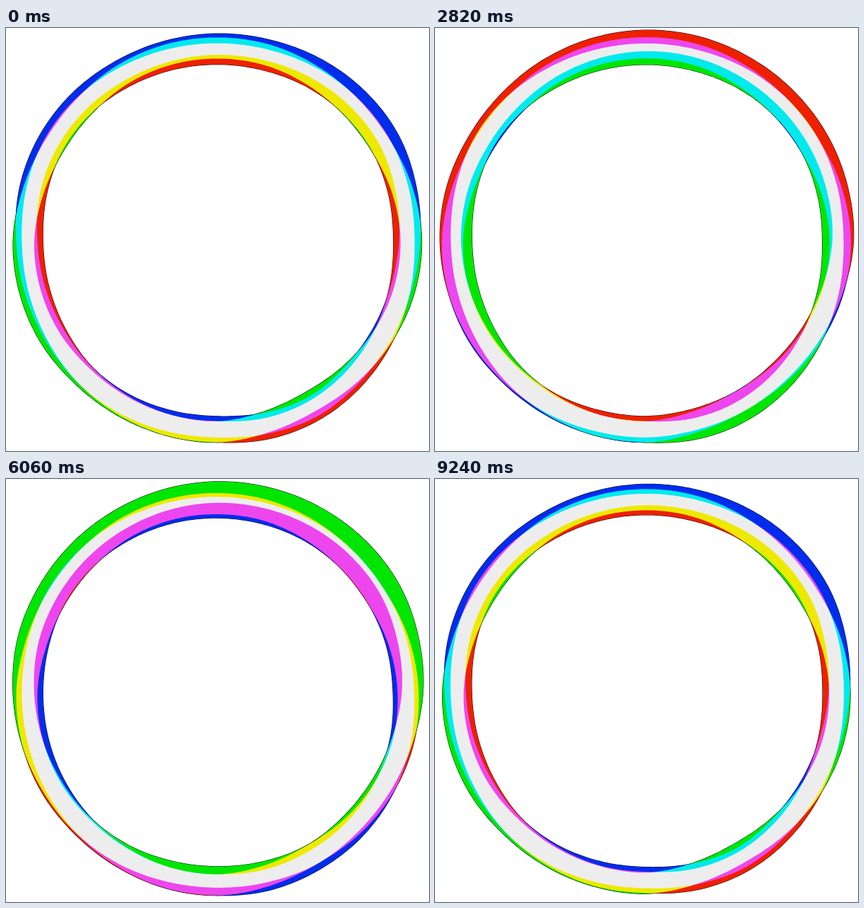
Write an HTML page with a canvas that moves like this. It is 600 px wide and 600 px high and loops after 9.3 s.

```html
<!DOCTYPE html>
<html lang="en">
<head>
<meta charset="utf-8">
<title>Wobbling colour rings</title>
<style>
  html, body { margin: 0; width: 100%; height: 100%; overflow: hidden; background: #fff; }
  canvas { display: block; width: 600px; height: 600px; }
</style>
</head>
<body>
<canvas id="stage" width="600" height="600"></canvas>
<script>
const ctx = document.getElementById('stage').getContext('2d');
const LOOP = 9300, STEP = 60, PERIOD = LOOP / 2;
const CENTER_X = 300.5, CENTER_Y = 300, RADIUS = 270.8, BAND = 30;
const POINTS = 360;

// Phase lag grows by 2.5 rad from ring to ring.
const RINGS = [
  { color: '#002cee', lag: 0 },
  { color: '#00e600', lag: 2.5 },
  { color: '#ee2000', lag: 5 }
];

// Radial swing every 15 degrees, clockwise from the right: [cosine part, sine part].
const SWING = [
  [1.4, -7.4], [-1.7, -3], [-2, 1.7], [-0.5, 5.5], [1.9, 7.2], [-1.2, 6.8],
  [-5, 3.5], [-4.3, 2.9], [-2.5, 0.7], [-1.6, -1.5], [-2.5, -4.7], [-1.6, -7],
  [0.4, -8.1], [4.9, -6.3], [6.9, -3.7], [6.9, -4.1], [5.7, -6.7], [5.6, -8.6],
  [6.2, -9.6], [6.9, -9.5], [8.9, -8], [10.4, -6.9], [10, -6.6], [5.4, -7.2]
];

function spline(a, b, c, d, u) {
  return b + 0.5 * u * (c - a + u * (2 * a - 5 * b + 4 * c - d + u * (3 * (b - c) + d - a)));
}

function swingAt(turn, part) {
  const n = SWING.length, i = Math.floor(turn * n);
  const value = k => SWING[(i + k + n) % n][part];
  return spline(value(-1), value(0), value(1), value(2), turn * n - i);
}

const outline = Array.from({ length: POINTS }, (_, i) => {
  const turn = i / POINTS, angle = turn * 2 * Math.PI;
  return {
    x: Math.cos(angle), y: Math.sin(angle),
    cosine: swingAt(turn, 0), sine: swingAt(turn, 1)
  };
});

function ringPath(phase) {
  const path = new Path2D(), c = Math.cos(phase), s = Math.sin(phase);
  for (const p of outline) {
    const r = RADIUS + p.cosine * c + p.sine * s;
    path.lineTo(CENTER_X + r * p.x, CENTER_Y + r * p.y);
  }
  path.closePath();
  return path;
}

function stroke(path, color, width) {
  ctx.strokeStyle = color;
  ctx.lineWidth = width;
  ctx.stroke(path);
}

function draw(time) {
  const phase = time / PERIOD * 2 * Math.PI;
  const paths = RINGS.map(ring => ringPath(phase - ring.lag));
  ctx.globalCompositeOperation = 'source-over';
  ctx.clearRect(0, 0, 600, 600);
  // A black base leaves a hairline edge and lets the colours add up.
  paths.forEach(path => stroke(path, '#000', BAND + 1));
  ctx.globalCompositeOperation = 'screen';
  paths.forEach((path, i) => stroke(path, RINGS[i].color, BAND));
}

function tick() {
  const time = performance.now() % LOOP;
  draw(Math.floor(time / STEP) * STEP);
  requestAnimationFrame(tick);
}
tick();
</script>
</body>
</html>
```
